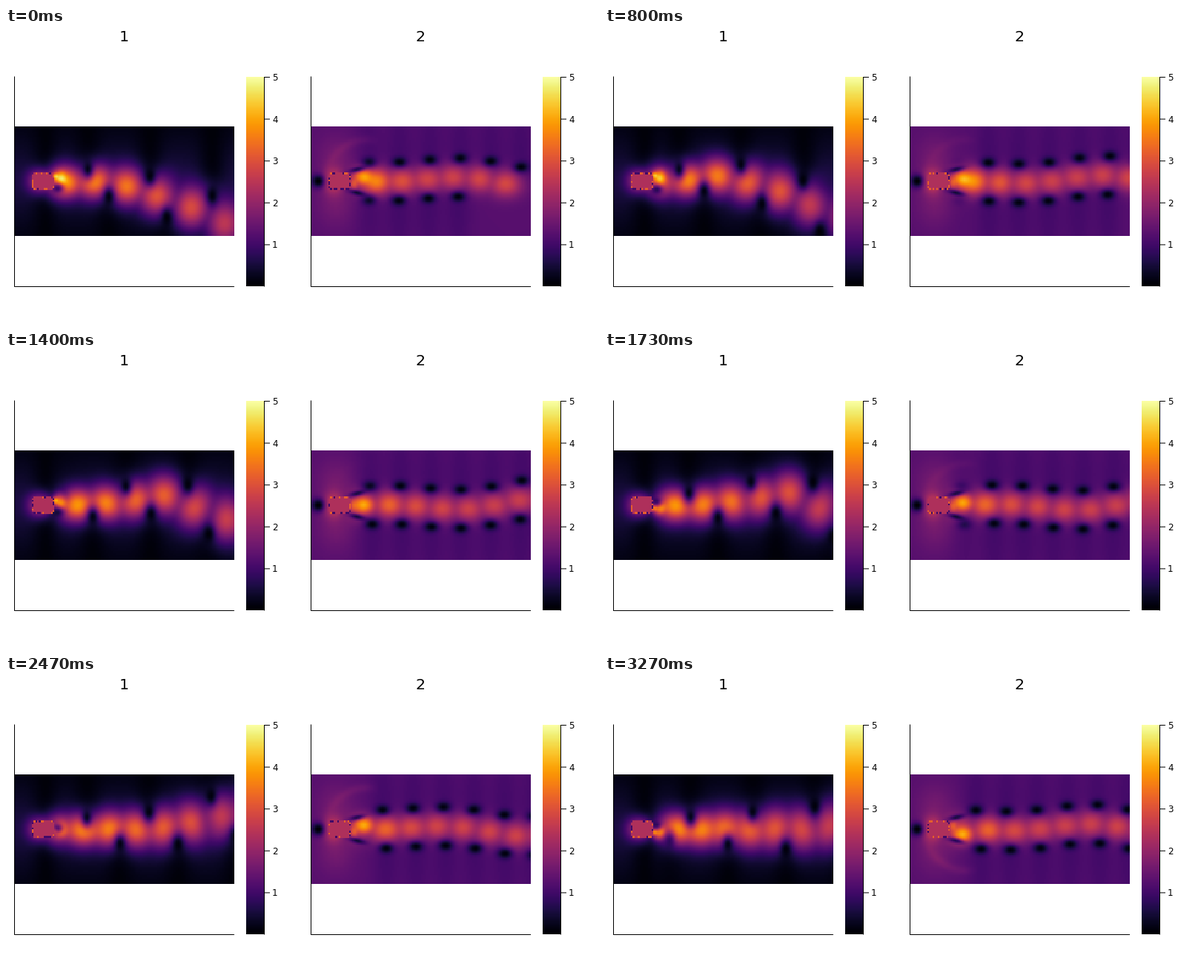
Animation, 800 px wide and 400 px high, one loop 3.34 s. Source, as a matplotlib script:

```python
import numpy as np
import matplotlib.pyplot as plt
from matplotlib.animation import FuncAnimation

FRAMES, LOOP_MS = 50, 3340
COLS, ROWS = 128, 64
LEFT, RIGHT, TOP, BOTTOM = 12, 308, 133, 281
MID = 207
BODY_VALUE = 2.33

X, Y = np.meshgrid(LEFT + (np.arange(COLS) + .5) * (RIGHT - LEFT) / COLS,
                   TOP + (np.arange(ROWS) + .5) * (BOTTOM - TOP) / ROWS)


def gauss(x, y, sx, sy):
    return np.exp(-((X - x) / sx) ** 2 / 2 - ((Y - y) / sy) ** 2 / 2)


def stack(values):
    """Shape feature values so that they broadcast over the grid."""
    return np.asarray(values)[:, None, None]


def blend(parts):
    return (parts ** 3).sum(axis=0) ** (1 / 3)


def carve(depth, shapes):
    return np.prod(1 - depth * shapes, axis=0)


def age(x):
    return np.clip((x - 90) / 180, -.1, 1.2)


def fade_in(x, start):
    return np.clip((x - start) / 20, 0, 1)


def octagon(grow=0):
    dx, dy = np.abs(X - 50), np.abs(Y - MID)
    return (dx < 15 + grow) & (dy < 12.5 + grow) & (dx + dy < 22.5 + grow)


BODY = octagon()
RIM = BODY & ~octagon(-2.3)


def add_body(field, rng):
    speckle = rng.choice([1, BODY_VALUE, BODY_VALUE, 3.2], size=field.shape)
    return np.where(RIM, speckle, np.where(BODY, BODY_VALUE, field))


def valleys(x, side, depth, fade):
    """Slow columns reaching outward from each vortex."""
    outside = 1 / (1 + np.exp(-side * (Y - MID) / 6))
    return carve(depth, fade * outside * gauss(x, MID, 13, 90))


# Blob positions along the wake at time zero; everything drifts downstream.
k = np.arange(15)
HOT_1 = stack(295 - 46 * k + .55 * k ** 2)
COLD_1 = stack(np.r_[np.linspace(278, -224, 7), np.linspace(217, -252, 7)])
SIDE_1 = stack(np.repeat([-1, 1], 7))
HOT_2 = stack(274 - 35 * k)
COLD_2 = stack(np.r_[np.linspace(295, -197, 13), np.linspace(210, -190, 11)])
SIDE_2 = stack(np.repeat([-1, 1], [13, 11]))


def swerve(start):
    return np.interp(start, [-60, 0, 75, 112, 200, 300],
                     [0, -10, -22, 0, 30, 52])


def still_air(n):
    shift = 6.5 * n + .012 * n * n

    x = HOT_1 + shift
    y = MID + swerve(HOT_1) * age(x)
    spread = 15 + .033 * np.clip(x - 80, 0, 240)
    peak = np.maximum(3.5 - .0058 * (x - 80), 0)
    hot = fade_in(x, 58) * peak * gauss(x, y, 18, spread)

    flip = np.cos(2 * np.pi * (n + 1.4) / 11.45)
    jet = 3.7 * gauss(74, MID - 5 * flip, 8, 9)
    lip = 3.6 * gauss(67, MID - 9 * flip, 4, 4)
    halo = 2.1 * gauss(47, MID, 12, 12)
    wake = blend(np.concatenate([hot, [jet, lip, halo]]))

    x = COLD_1 + shift
    y = MID + SIDE_1 * (14 + 15 * age(x)) + swerve(COLD_1) * age(x)
    fade = fade_in(x, 74)
    haze = .1 + .42 * np.exp(-((Y - MID) / 42) ** 2 / 2)
    haze = haze * valleys(x, SIDE_1, .8, fade) * (1 - .8 * gauss(53, MID, 12, 90))
    field = (haze + wake) * carve(.88, fade * gauss(x, y, 5.5, 9))
    field *= 1 - .7 * gauss(70, MID + 13 * flip, 6, 5)
    return add_body(field, np.random.default_rng(n))


def weave(start):
    return 8 * np.sin(2 * np.pi * (start - 10) / 250)


def moving_air(n):
    shift = 6.2 * n

    x = HOT_2 + shift
    y = MID + weave(HOT_2) * age(x)
    peak = 1.65 + 1.2 * np.exp(-np.clip(x - 90, 0, 300) / 32)
    hot = fade_in(x, 72) * peak * gauss(x, y, 16, 13)

    flip = np.cos(2 * np.pi * (n / 8.55 - .1))
    jet = 2.8 * gauss(83, MID - 7 * flip, 11, 9)
    root = 1.7 * gauss(70, MID + 4 * flip, 5, 7)
    halo = 1.2 * gauss(42, MID, 9, 12)
    wake = blend(np.concatenate([hot, [jet, root, halo]]))

    lobes = .35 * (gauss(45, 177, 18, 22) + gauss(45, 237, 18, 22))
    front = np.exp(-((np.hypot(X - 88, Y - MID) - 56) / 6) ** 2)
    reach = np.clip(flip * (MID - Y) / 40, 0, 1) * fade_in(-X, -105)

    x = COLD_2 + shift
    y = MID + SIDE_2 * 26 + weave(COLD_2) * age(x)
    fade = fade_in(x, 74)
    ambient = (1.25 + lobes + .2 * reach * front) * valleys(x, SIDE_2, .2, fade)
    field = (ambient + wake) * carve(.9, fade * gauss(x, y, 7, 5))
    field *= 1 - .98 * gauss(21, MID, 6, 6)
    for side in (-1, 1):
        field *= 1 - .75 * gauss(74, MID + side * (14 + .22 * (X - 66)), 8, 2.6)
    return add_body(field, np.random.default_rng(100 + n))


fig = plt.figure(figsize=(8, 4), dpi=100, facecolor="white")
ax = fig.add_axes([0, 0, 1, 1])
ax.axis("off")
PX = .72


def heatmap(data, x0, x1, y0, y1):
    return ax.imshow(data, cmap="inferno", vmin=0, vmax=5, aspect="auto",
                     extent=(x0, x1, y1, y0), interpolation="nearest")


def rule(xs, ys):
    ax.plot(xs, ys, color="black", lw=PX, solid_capstyle="butt", snap=False)


def panel(offset, title, field):
    image = heatmap(field(0), offset + LEFT, offset + RIGHT, TOP, BOTTOM)
    rule([offset + 11.5, offset + 11.5, offset + 308], [65.5, 349.5, 349.5])
    heatmap(np.linspace(5, 0, 256)[:, None], offset + 324, offset + 348, 66, 349)
    rule([offset + 348.5] * 2, [66, 349.5])
    for value in range(1, 6):
        y = 349.5 - value * 56.6
        rule([offset + 348.5, offset + 356], [y, y])
        ax.text(offset + 359, y - .5, str(value), fontsize=12 * PX,
                family="DejaVu Sans", va="center_baseline")
    ax.text(offset + 159.5, 18, title, fontsize=20.5 * PX,
            family="DejaVu Sans", ha="center", va="baseline")
    return image


panels = [(panel(0, "1", still_air), still_air),
          (panel(400, "2", moving_air), moving_air)]
ax.set_xlim(0, 800)
ax.set_ylim(400, 0)


def draw(n):
    for image, field in panels:
        image.set_data(field(n))
    return [image for image, _ in panels]


anim = FuncAnimation(fig, draw, frames=FRAMES, interval=LOOP_MS / FRAMES,
                     repeat=True, repeat_delay=0, blit=False)
plt.show()
```
